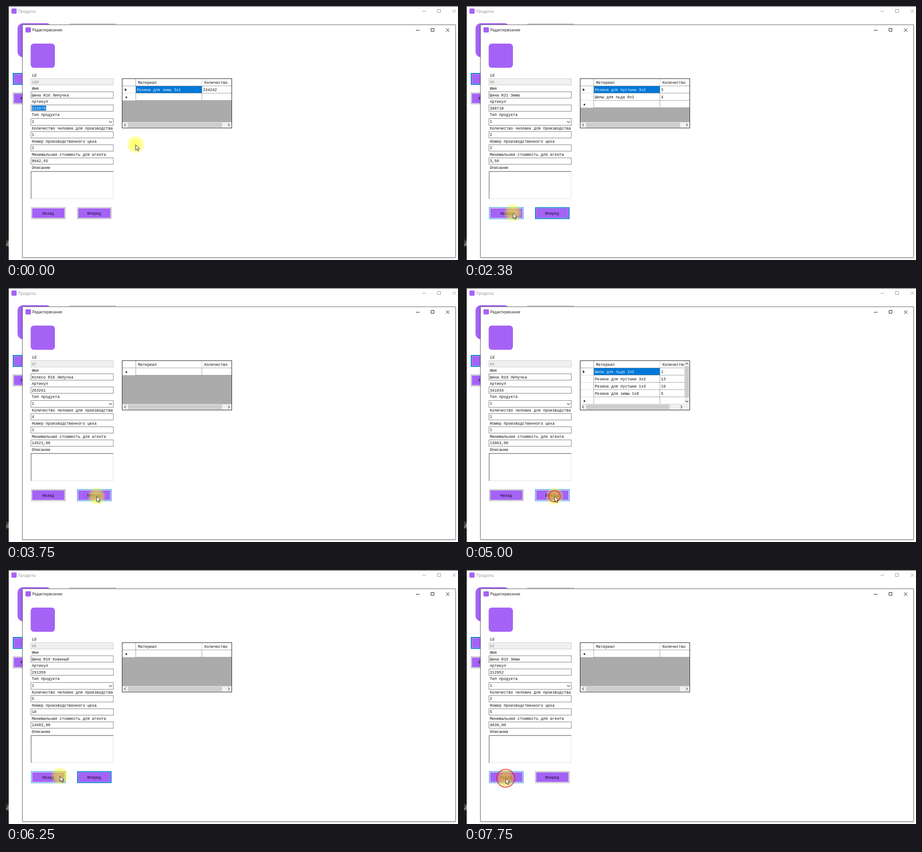
An HTML page that plays this animation: 998x561 px, repeating every 8 s.

```html
<!DOCTYPE html>
<html lang="ru">
<head>
<meta charset="utf-8">
<title>Редактирование</title>
<style>
html, body { margin: 0; width: 100%; height: 100%; overflow: hidden; background: #fff; }
svg { display: block; width: 998px; height: 561px; }
text { font: 8.53px "Liberation Mono", "Courier New", monospace; fill: #111; white-space: pre; }
.title { font: 8.2px "Open Sans", "Noto Sans", sans-serif; }
.line { fill: none; stroke: #111; }
.pale { stroke: #999; }
.field { fill: #fff; stroke: #7a7a7a; }
.mark { fill: #a463f5; }
.chev { fill: none; stroke: #444; stroke-width: 1.1; }
.window { fill: #fff; stroke: #6c6c6c; filter: drop-shadow(0 1px 2px #0003); }
</style>
</head>
<body>
<svg viewBox="0 0 998 561">
  <defs>
    <radialGradient id="glow">
      <stop offset="0" stop-color="#ff0" stop-opacity=".57"/>
      <stop offset=".5" stop-color="#ff0" stop-opacity=".52"/>
      <stop offset=".8" stop-color="#ff0" stop-opacity=".3"/>
      <stop offset="1" stop-color="#ff0" stop-opacity="0"/>
    </radialGradient>
    <clipPath id="cells"><rect x="257" y="161" width="241" height="95"/></clipPath>
  </defs>

  <rect width="6" height="561" fill="#1b1b1c"/>
  <rect y="516" width="6" height="16" fill="#3a3a3b"/>
  <text class="title" x="1" y="528" style="fill:#ddd;font-style:italic">Д</text>
  <rect x="6" width="992" height="561" fill="#fff"/>
  <rect width="998" height="1" fill="#222"/>
  <rect class="mark" x="12" y="5.5" width="11.5" height="11.5" rx="2"/>
  <text class="title" x="27" y="15" style="fill:#8c8c8c">Продукты</text>
  <path class="line pale" d="M919.5 11.5h8M952.5 7.5h7v7h-7zM986 7.5l7.5 7.5M993.5 7.5l-7.5 7.5"/>
  <rect class="mark" x="25.5" y="38" width="75.5" height="75" rx="12"/>
  <g id="behind"></g>

  <rect class="window" x="36.5" y="41.5" width="956" height="514"/>
  <rect class="mark" x="43" y="47" width="12" height="11.5" rx="2"/>
  <text class="title" x="58" y="56">Редактирвоание</text>
  <path class="line" d="M905 53.5h8M938.5 49.5h6.5v6.5h-6.5zM971.5 49.5l7.5 7.5M979 49.5l-7.5 7.5"/>
  <rect class="mark" x="54.5" y="83" width="53.5" height="53.5" rx="7"/>

  <g id="form"></g>
  <rect x="55" y="365" width="182" height="61" fill="#fff"/>
  <path d="M55.5 426V365.5H237" fill="none" stroke="#777" stroke-width="1.4"/>
  <path d="M236.5 366v59.5H56" fill="none" stroke="#dedede"/>
  <path class="chev" d="M227.5 254.5l3.3 3.3 3.3-3.3"/>
  <g id="grid"></g>
  <g id="buttons"></g>

  <g id="pointer">
    <circle r="20.5" fill="url(#glow)"/>
    <circle id="ring" fill="#f00" fill-opacity=".1" stroke="#d8141e" stroke-width="1.3"/>
    <path d="M.3 .3v12l2.8-2.6 2 4.6 2-.9-2-4.4h3.9z" fill="#fff" stroke="#111" stroke-width=".9"/>
  </g>
</svg>
<script>
const $ = id => document.getElementById(id);
const BLUE = '#0078d7', LOOP = 8000;
const labels = ['id', 'Имя', 'Артикул', 'Тип продукта', 'Количество человек для производства',
  'Номер производственного цеха', 'Минимальная стоимость для агента', 'Описание'];

// fields in label order, then material rows
const records = {
  100: ['Шина R16 Липучка|320970|1|1|2|8042,55', 'Резина для зимы 3x1|234242'],
  99: ['Шина R21 Зима|398710|1|2|2|3,50', 'Резина для пустыни 3x2|3', 'Шипы для льда 0x1|4'],
  98: ['Шина R20 Кованый|328305|1|3|4|6083,00', 'Резина для зимы 2x1|7', 'Шипы для льда 1x2|12'],
  97: ['Колесо R16 Липучка|263261|1|4|1|14521,00'],
  96: ['Колесо R18 Зима|299112|1|3|6|10561,00'],
  95: ['Колесо R17 Лето|330951|1|2|9|9527,00', 'Резина для зимы 1x2|8',
    'Шипы для льда 2x1|3', 'Резина для пустыни 0x2|11', 'Шипы для льда 1x3|6'],
  94: ['Шина R19 Липучка|341034|1|1|1|13063,00', 'Шипы для льда 2x2|1',
    'Резина для пустыни 3x2|13', 'Резина для пустыни 1x3|19', 'Резина для зимы 1x0|5'],
  93: ['Шина R15 Зима|312952|1|2|5|4039,00'],
  92: ['Шина R17 Лето|347227|1|3|8|7306,00', 'Шипы для льда 1x1|9'],
  91: ['Шина R18 Кованый|300047|1|4|7|11329,00', 'Резина для зимы 2x2|4'],
  90: ['Шина R19 Кованый|291359|1|5|10|14682,00'],
};

// [time, record]
const clicks = [[2100, 99], [3220, 98], [3550, 97], [4200, 96], [4600, 95], [4930, 94],
  [5330, 93], [5680, 92], [5960, 91], [6100, 90], [6950, 91], [7300, 92], [7640, 93]];

// [time, x, y]
const path = [[0, 286, 306], [380, 300, 330], [750, 285, 392], [1000, 143, 482], [1250, 143, 482],
  [1380, 182, 459], [1750, 180, 436], [2000, 186, 436], [2100, 200, 459], [2250, 200, 459],
  [2380, 108, 457], [2630, 95, 461], [2950, 100, 460], [3200, 200, 460], [6130, 200, 460],
  [6250, 119, 455], [6380, 96, 461], [6700, 92, 463], [6950, 92, 460], [LOOP, 92, 460]];

const rect = (x, y, w, h, fill, more = '') =>
  `<rect x="${x}" y="${y}" width="${w}" height="${h}" fill="${fill}" ${more}/>`;
const text = (x, y, s, fill = '#111', more = '') =>
  `<text x="${x}" y="${y}" style="fill:${fill}" ${more}>${s}</text>`;
const chevron = (x, y, turn) =>
  `<path class="chev" d="M-1.5 -3l3 3-3 3" transform="translate(${x} ${y}) rotate(${turn})"/>`;

function button(x, y, label, hover, focus) {
  const edge = hover || focus ? BLUE : '#adadad', wide = focus && !hover ? 2 : 1;
  return rect(x, y, 76, 26, edge) +
    rect(x + wide, y + wide, 76 - 2 * wide, 26 - 2 * wide, hover ? '#e5f1fb' : '#e1e1e1') +
    rect(x + 2.5, y + 2.5, 71, 21, '#a463f5') +
    text(x + 37.5, y + 16.5, label, '#140a22', 'text-anchor="middle"');
}

function form(id, selected, focused) {
  const values = [id, ...records[id][0].split('|')];
  return labels.map((label, i) => {
    const mid = 167.5 + 29.15 * i;
    let out = text(57, Math.round(mid - 11.5), label);
    if (i === 7) return out;
    const active = i === 2 && focused;
    out += `<rect class="field" x="55" y="${Math.round(mid - 7.4) + .5}" width="182" height="${i === 3 ? 15 : 14}"
      style="${i ? '' : 'fill:#f0f0f0;stroke:#ccc'}${active ? 'stroke:' + BLUE : ''}"/>`;
    const marked = i === 2 && selected;
    if (marked) out += rect(57, Math.round(mid - 5.5), 31.5, 11, BLUE);
    return out + text(57, Math.round(mid + 3), values[i], marked ? '#fff' : i ? '#111' : '#858585');
  }).join('');
}

function grid(id) {
  const rows = records[id].slice(1), tall = rows.length > 3;
  const line = (x, y, w, h) => rect(x, y, w, h, '#a0a0a0');
  let cells = rect(257, 161, 241, 16, '#fff') + line(286, 161, 1, 16) + rect(432, 161, 1, 16, '#d0d0d0') +
    line(257, 176, 241, 1) + text(291.5, 172, 'Материал') + text(438, 172, 'Количество');
  [...rows, '|'].forEach((row, i) => {
    const y = 177 + 16 * i, [name, count] = row.split('|'), current = !i && rows.length;
    cells += rect(257, y, 241, 16, '#fff') + rect(257, y + 15, 29, 1, '#dcdcdc') +
      line(286, y + 15, 212, 1) + line(286, y, 1, 16) + line(432, y, 1, 16);
    if (current) cells += rect(287, y, 145.5, 15, BLUE) +
      `<path d="M262.5 ${y + 4.5}l4 3.5-4 3.5z" fill="#222"/>`;
    if (i === rows.length) cells += text(263.3, y + 13.5, '*', '#111', 'stroke="#111" stroke-width=".6"');
    cells += text(289, y + 11, name, current ? '#e8f4ff' : '#111') + text(435, y + 11, count);
  });
  const right = tall ? 486 : 498, thumb = tall ? 184.5 : 207.5;
  let out = rect(256.5, 160.5, 242, 109, '#ababab') + `<g clip-path="url(#cells)">${cells}</g>` +
    rect(257, 256.5, 241, 12.5, '#f0f0f0') + rect(269.5, 257.5, thumb, 10.5, '#cdcdcd') +
    chevron(263, 262.7, 180) + chevron(right - 6, 262.7, 0);
  if (tall) out += rect(486, 161, 12, 96, '#f0f0f0') + rect(487, 173, 10, 69.5, '#cdcdcd') +
    chevron(492, 167, -90) + chevron(492, 250.5, 90);
  return out + rect(256.5, 160.5, 242, 109, 'none', 'stroke="#1a1a1a"');
}

function cursorAt(t) {
  const i = Math.max(1, path.findIndex(p => p[0] > t));
  const a = path[i - 1], b = path[i], k = (t - a[0]) / (b[0] - a[0]);
  return [a[1] + (b[1] - a[1]) * k, a[2] + (b[2] - a[2]) * k];
}

function snap(t) {
  const ms = t % 1000;
  return t - ms + [750, 630, 380, 250, 0].find(s => s <= ms);
}

$('behind').innerHTML = rect(140, 39, 103, 30, '#adadad') + rect(141, 40, 101, 28, '#e1e1e1') +
  button(15, 148, '', false, true) + button(15, 191, '', false, false) + text(32, 207, 'Ре');

const cache = {};
function put(id, key, make) {
  if (cache[id] === key) return;
  cache[id] = key;
  $(id).innerHTML = make();
}

function draw(t) {
  const [x, y] = cursorAt(t);
  const click = clicks.filter(c => c[0] <= t).pop();
  const id = click ? click[1] : 100, age = click ? t - click[0] : LOOP;
  const over = left => x >= left && x < left + 76 && y >= 444 && y < 470;
  const focus = !click ? 0 : t < 6950 ? 2 : 1;
  const selected = !focus, lit = selected && t >= 250;
  put('form', [id, selected, lit].join(), () => form(id, selected, lit));
  put('grid', id, () => grid(id));
  put('buttons', [over(55), over(157), focus].join(), () =>
    button(55.5, 444.5, 'Назад', over(55), focus === 1) +
    button(157, 444.5, 'Вперед', over(157), focus === 2));
  $('pointer').setAttribute('transform', `translate(${x} ${y})`);
  $('ring').setAttribute('r', age < 140 ? age * .18 : 0);
  $('ring').style.display = age < 140 ? '' : 'none';
}

function tick() {
  draw(snap(performance.now() % LOOP));
  requestAnimationFrame(tick);
}
tick();
</script>
</body>
</html>
```
